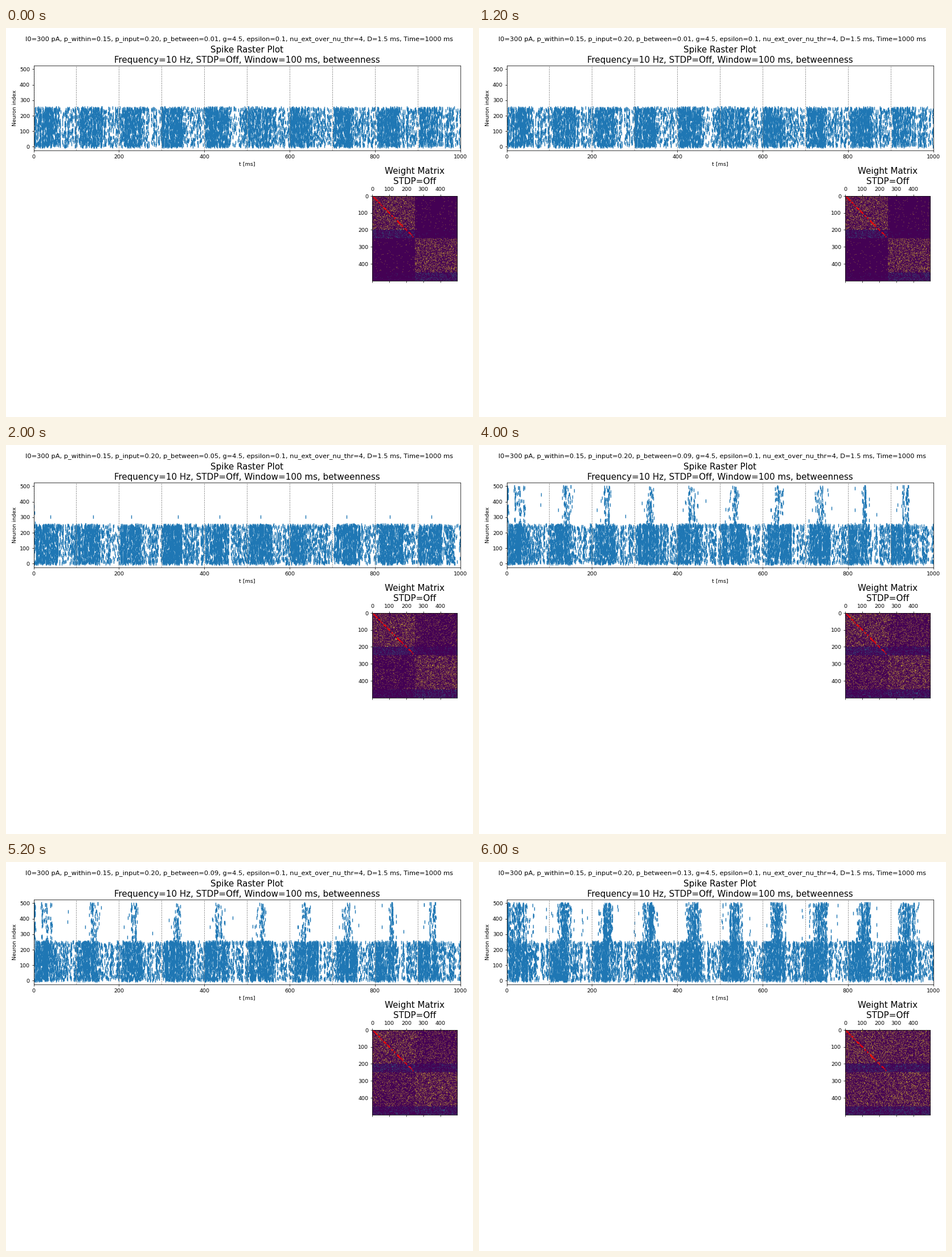
Animation of 820 by 683 pixels, one loop 8 s. Source, as a matplotlib script:

```python
import numpy as np
import matplotlib.pyplot as plt
from matplotlib.animation import FuncAnimation

# A 12 x 10 inch sheet on an 820 x 683 stage
W, H, DPI = 820, 683, 820 / 12
N, HALF, EXC = 500, 250, 200
DURATION, PERIOD = 1000, 100
CYCLES = range(0, DURATION, PERIOD)
P_WITHIN = 0.15

# p_between, spikes per volley of the second group, its earliest neuron, phase
SETTINGS = [(0.01, 0, 0, 0), (0.05, 0, 301, 36),
            (0.09, 75, 345, 17), (0.13, 280, 434, 14)]


def driven_spikes(rng):
    """First group: a busy half and a patchy half in every cycle."""
    t = np.arange(DURATION)
    rate = np.full(DURATION, 6.2)
    for start in CYCLES:
        begin = max(start + rng.normal(3, 4), 1)
        rate[(t > begin) & (t < begin + rng.normal(51, 4))] = 16
    noise = np.convolve(rng.normal(size=DURATION), np.ones(3) / 3, "same")
    rate *= np.exp(0.55 * noise)
    for start in CYCLES:
        for pause in start + rng.uniform(56, 102, 3):
            rate *= 1 - 0.9 * np.exp(-((t - pause) / 2) ** 2)
    times = np.repeat(t, rng.poisson(rate)) + 0.0
    times += rng.random(times.size)
    return np.column_stack([times, rng.integers(0, HALF, times.size)])


def volley(rng, centre, spread, count):
    """Second group: spikes gathered in a few narrow stripes."""
    stripes = rng.normal(centre, spread, 5 + count // 10)
    times = np.abs(rng.choice(stripes, count) + rng.normal(0, 1, count))
    return np.column_stack([times, rng.integers(HALF, N, count)])


def make_spikes(seed, size, leader, phase):
    rng = np.random.default_rng(seed)
    parts = [driven_spikes(rng)]
    if leader:
        parts.append(volley(rng, 2, 1.5, 3 + size // 2))
        for start in CYCLES:
            parts.append([(start + rng.normal(phase, 4), leader)])
    if size:
        for start in CYCLES:
            spread = 5 + size / 90 + 5 * (start == 0)
            centre = start + rng.normal(36, 2.5) - 6 * (start == 0)
            parts.append(volley(rng, centre, spread, size))
            parts.append(volley(rng, centre, 3 * spread, size // 16))
    return np.vstack(parts)


def make_weights(seed, p_between):
    rng = np.random.default_rng(seed)
    module = np.arange(N) // HALF
    same = module[:, None] == module
    linked = rng.random((N, N)) < np.where(same, P_WITHIN, p_between)
    strength = np.where(np.arange(N) % HALF < EXC, 1.0, 0.42)
    return (linked * strength[:, None])[::2, ::2]


def place(left, top, right, bottom):
    width, height = fig.bbox.size
    return fig.add_axes([left / width, (H - bottom) / height,
                         (right - left) / width, (bottom - top) / height])


spikes = [make_spikes(20 + k, *s[1:]) for k, s in enumerate(SETTINGS)]
weights = [make_weights(50 + k, s[0]) for k, s in enumerate(SETTINGS)]

fig = plt.figure(figsize=(12, 10), dpi=DPI, facecolor="white")
heading = fig.suptitle("", fontsize=12)

raster = place(48.5, 66, 797.5, 214.6)
raster.set(xlim=(0, DURATION), ylim=(-24.95, 523.95), xlabel="t [ms]",
           ylabel="Neuron index", xticks=range(0, DURATION + 1, 200),
           yticks=range(0, N + 1, 100))
raster.set_title("Spike Raster Plot\nFrequency=10 Hz, STDP=Off, "
                 "Window=100 ms, betweenness", fontsize=16)
dots = raster.scatter([], [], s=36, marker="|", linewidths=1.5, color="C0")
for t in CYCLES:
    raster.axvline(t, color="gray", ls="--", lw=0.8)

matrix = place(643, 294.6, 792.3, 443.8)
image = matrix.imshow(weights[0], cmap="viridis", vmin=0, vmax=1,
                      extent=(-0.5, N - 0.5, N - 0.5, -0.5), aspect="auto",
                      interpolation="bilinear", interpolation_stage="rgba")
matrix.set(xticks=range(0, N, 100), yticks=range(0, N, 100))
matrix.tick_params(axis="x", top=True, labeltop=True, bottom=True,
                   labelbottom=False)
matrix.set_title("Weight Matrix\nSTDP=Off", fontsize=16)
inputs = np.random.default_rng(3).choice(np.arange(5, 242), 50, replace=False)
matrix.scatter(inputs, inputs, s=5, color="red", linewidths=0)


def update(k):
    heading.set_text(f"I0=300 pA, p_within={P_WITHIN:.2f}, p_input=0.20, "
                     f"p_between={SETTINGS[k][0]:.2f}, g=4.5, epsilon=0.1, "
                     "nu_ext_over_nu_thr=4, D=1.5 ms, Time=1000 ms")
    dots.set_offsets(spikes[k])
    image.set_data(weights[k])
    return heading, dots, image


anim = FuncAnimation(fig, update, frames=len(SETTINGS), interval=2000,
                     repeat=True, repeat_delay=0, blit=False)
plt.show()
```
